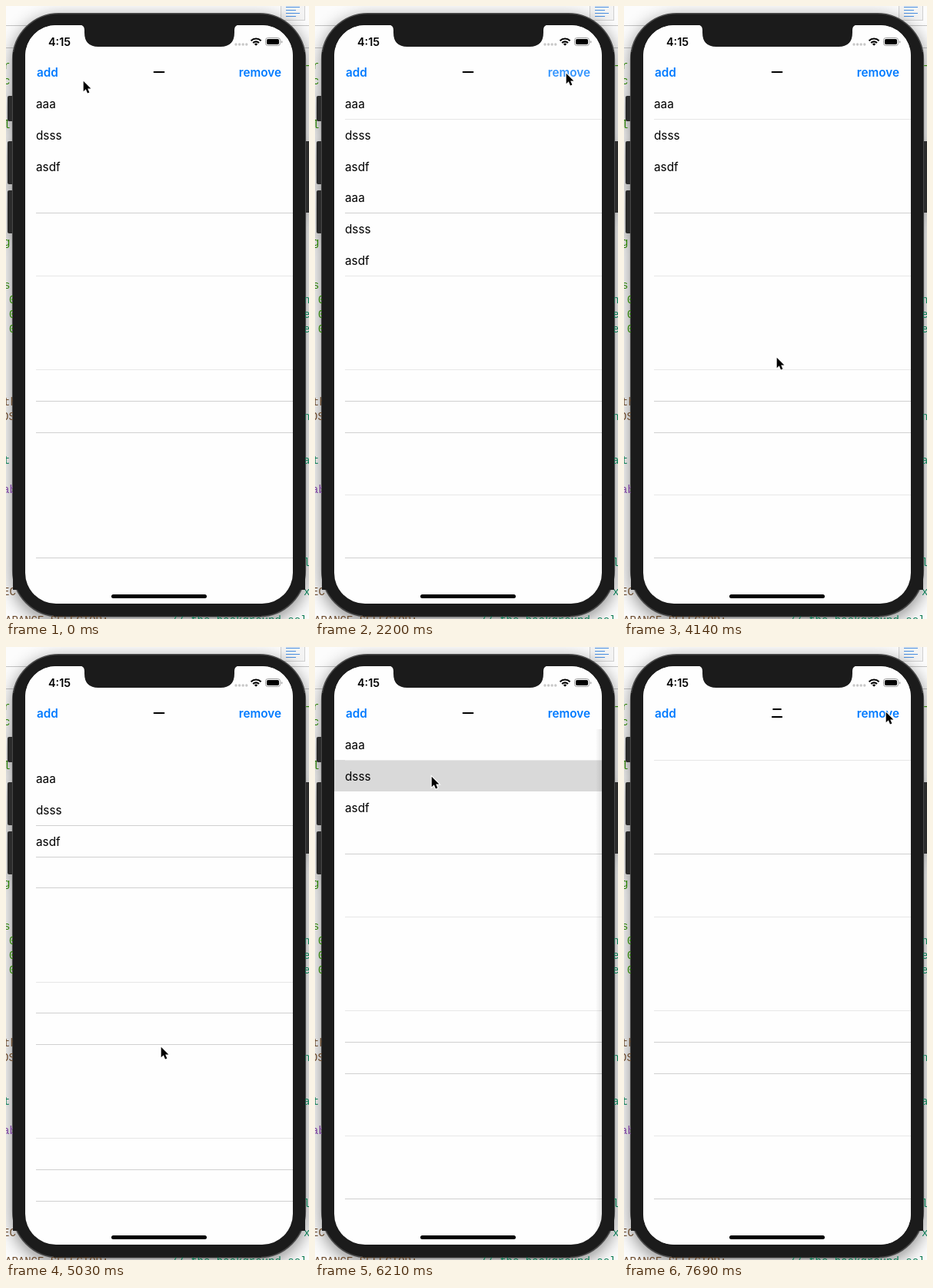
Write an HTML page that moves like this. It is 394 by 798 pixels and loops after 7.99 s.

```html
<!DOCTYPE html>
<html lang="en">
<head>
<meta charset="utf-8">
<title>Table view demo</title>
<style>
  html, body { margin: 0; width: 100%; height: 100%; overflow: hidden; background: #fcfcfc; }
  svg { display: block; width: 394px; height: 798px; }
  text { font-family: Inter, Roboto, sans-serif; font-size: 15.3px; }
  #code text { font: 14px "Liberation Mono", monospace; white-space: pre; }
  #body { filter: drop-shadow(0 6px 11px rgba(0, 0, 0, .45)); }
  .button { font-weight: 600; fill: #007aff; }
  .title { font: bold 15.5px "Noto Sans CJK SC", "Noto Sans CJK JP", sans-serif; text-anchor: middle; }
</style>
</head>
<body>
<svg viewBox="0 0 394 798">
  <defs>
    <clipPath id="screen"><rect x="25" y="25" width="348" height="753" rx="40"/></clipPath>
    <linearGradient id="edge">
      <stop offset="0" stop-color="#000" stop-opacity="0"/>
      <stop offset="1" stop-color="#000" stop-opacity=".1"/>
    </linearGradient>
  </defs>

  <rect width="394" height="798" fill="#fcfcfc"/>
  <path d="M0 25.5H394M0 54.5H394" stroke="#c4c4c4"/>
  <rect x="357.5" y="-4.5" width="31" height="23" fill="#f4f4f4" stroke="#d0d0d0"/>
  <path d="M364 1.5h18M364 5.5h13M364 9.5h18M364 13.5h13" stroke="#4a90e2"/>

  <g id="body" fill="#2b2b2b">
    <rect x="2" y="117" width="10" height="33" rx="2"/>
    <rect x="2" y="176" width="10" height="56" rx="2"/>
    <rect x="2" y="240" width="10" height="56" rx="2"/>
    <rect x="386" y="176" width="10" height="93" rx="2"/>
    <rect x="8.7" y="9.7" width="380.6" height="785" rx="60" fill="#1b1b1b" stroke="#484848" stroke-width="1.6"/>
  </g>
  <g id="code"></g>

  <g clip-path="url(#screen)">
    <rect x="25" y="25" width="348" height="753" fill="#fefefe"/>
    <g id="list">
      <g id="content">
        <rect id="picked" x="25" y="147" width="348" height="41" fill="#d9d9d9"/>
        <g id="lines"></g>
        <g id="rows"></g>
      </g>
      <rect id="dim" x="25" y="107" width="348" height="671"/>
    </g>
    <g id="next">
      <rect x="17" y="107" width="8" height="671" fill="url(#edge)"/>
      <rect x="25" y="107" width="348" height="671" fill="#fefefe"/>
      <g id="nextLines"></g>
    </g>
    <rect x="25" y="25" width="348" height="82" fill="#fefefe"/>

    <text x="55" y="51.5" font-weight="600" style="font-size:14.4px">4:15</text>
    <g fill="#c8c8c8">
      <circle cx="299" cy="50" r="1.7"/><circle cx="303.6" cy="50" r="1.7"/>
      <circle cx="308.2" cy="50" r="1.7"/><circle cx="312.8" cy="50" r="1.7"/>
    </g>
    <g fill="none" stroke="#000" stroke-width="2.1">
      <path d="M318.6 45.2a9.3 9.3 0 0 1 13 0M321.2 48a5.6 5.6 0 0 1 7.8 0"/>
      <path d="M325.1 51.8l-2.2-2.2a3.2 3.2 0 0 1 4.4 0z" fill="#000" stroke="none"/>
    </g>
    <rect x="337.5" y="41.5" width="19" height="10" rx="3" fill="none" stroke="#999"/>
    <rect x="339" y="43" width="16" height="7" rx="1.7"/>
    <path d="M358 45v3.4q1.4-.5 1.4-1.7t-1.4-1.7z" fill="#999"/>

    <text id="add" class="button" x="40" y="92">add</text>
    <text id="remove" class="button" x="358" y="92" text-anchor="end">remove</text>
    <text id="one" class="title" x="199" y="92">一</text>
    <text id="two" class="title" x="199" y="92">二</text>

    <path d="M96 24.500q6 .5 6 7v3q0 18.500 18 18.500H279q18 0 18-18.500v-3q0-6.500 6-7z" fill="#1b1b1b"/>
    <rect x="137" y="766" width="124" height="5" rx="2.500"/>
  </g>

  <path id="cursor" d="M0 0V13.500L3.100 10.600 5.300 15.800 7.700 14.800 5.500 9.700H9.700Z"
        stroke="#fff" stroke-width="2" paint-order="stroke"/>
</svg>

<script>
const LOOP = 7990, TICK = 147.7, ROW = 40.77;
const $ = id => document.getElementById(id);

// Code peeking out around the phone: text, x, middle y, colour
const GREEN = '#2a8000', TEAL = '#0b7d55', BROWN = '#6b4a2b';
$('code').innerHTML = [
  ['r', -3, 77, GREEN], ['c', -3, 97, GREEN], ['l', -3, 154, GREEN], ['g', -3, 307, GREEN],
  ['s', -3, 363, GREEN], ['0', 4, 382, GREEN], ['0', 4, 401, GREEN], ['0', 4, 420, GREEN],
  ['th', -3, 515, BROWN], ['OS', -5, 534, BROWN], ['t:', -3, 591, TEAL], ['ab', -4, 629, '#7a3e9d'],
  ['EC', -4, 762, BROWN], ['-', 388, 77, GREEN], ['n', 387, 382, TEAL], ['e', 387, 401, TEAL],
  ['e', 387, 420, TEAL], ['n', 387, 534, TEAL], ['a', 387, 591, TEAL], ['l', 387, 724, TEAL],
  ['x', 387, 762, TEAL], ['ARANCE_SELECTOR:', -1, 799, BROWN], ['// the background sel', 215, 799, TEAL]
].map(([s, x, y, c]) => `<text x="${x}" y="${y + 5}" fill="${c}">${s}</text>`).join('')
  + '<rect x="9" y="60" width="380" height="700" fill="#1b1b1b"/>'
  + '<rect x="62" y="780" width="270" height="14.5" fill="#1b1b1b"/>';

$('rows').innerHTML = ['aaa', 'dsss', 'asdf', 'aaa', 'dsss', 'asdf']
  .map((s, i) => `<text x="39" y="${133 + i * ROW}">${s}</text>`).join('');

// Hairlines: some drop out or fade depending on where they fall
const REST = { shown: [0, 3, 5, 8, 9, 10, 12, 14], faint: [0, 5, 8, 12] };
const PULLED = { shown: [1, 2, 3, 6, 7, 8, 11, 12, 13], faint: [6, 11] };

const hairlines = ({ shown, faint }, shift = 0, skip = []) => shown
  .filter(k => !skip.includes(k))
  .map(k => `<rect x="39" y="${Math.round(147 + ROW * k + shift) - shift}" width="334" height="1" `
    + `fill="${faint.includes(k) ? '#e7e7e7' : '#d0d0d0'}"/>`).join('');
$('nextLines').innerHTML = hairlines(REST);

// Linear keyframes: [tick, value, ...]
function at(keys, n) {
  const i = keys.findIndex(k => k[0] > n);
  if (i < 0) return keys.at(-1).slice(1);
  if (i === 0) return keys[0].slice(1);
  const a = keys[i - 1], b = keys[i], u = (n - a[0]) / (b[0] - a[0]);
  return a.slice(1).map((v, j) => v + (b[j + 1] - v) * u);
}

const POINTER = [
  [0, 100, 97], [3, 52, 83], [12, 52, 83], [15, 326, 87], [19, 326, 87], [23, 198, 457], [29, 198, 457],
  [33, 201, 560], [34, 201, 520], [37, 201, 168], [38, 201, 168], [41, 151, 168], [47, 151, 168], [52, 340, 84]
];
const PULL = [[29, 0], [33, 58], [34, 44], [35, 28], [36, 16], [37, 8.6], [38, 3], [39, 0]];
const ADD = [[4, 1], [5, .3], [7, 1]];
const REMOVE = [[13, 1], [14, .4], [15, .8], [18, 1]];

function move(id, x, y = 0) {
  $(id).setAttribute('transform', `translate(${x} ${y})`);
}
function fade(id, value) {
  $(id).setAttribute('opacity', value);
}

function draw(now) {
  const n = Math.floor((now % LOOP + 15) / TICK);
  const [pull] = at(PULL, n);

  move('cursor', ...at(POINTER, n).map(v => v + .7));
  fade('add', at(ADD, n)[0]);
  fade('remove', at(REMOVE, n)[0]);

  const count = n >= 9 && n < 28 ? 6 : 3;
  [...$('rows').children].forEach((row, i) => row.setAttribute('opacity', +(i < count)));
  $('lines').innerHTML = hairlines(pull ? PULLED : REST, pull, n < 9 ? [0, 12] : []);
  move('content', 0, pull);
  fade('picked', +(n >= 41));

  // Critically damped push; left is the share still to travel
  const w = Math.max(0, n - 42) * 2.67;
  const left = n > 45 ? 0 : (1 + w) * Math.exp(-w);
  move('list', -104 * (1 - left));
  fade('dim', .1 * (1 - left));
  move('next', 348 * left);
  fade('next', +(n >= 42));
  move('one', -62 * (1 - left));
  fade('one', left);
  move('two', 62 * left);
  fade('two', 1 - left);

  requestAnimationFrame(draw);
}
draw(0);
</script>
</body>
</html>
```
